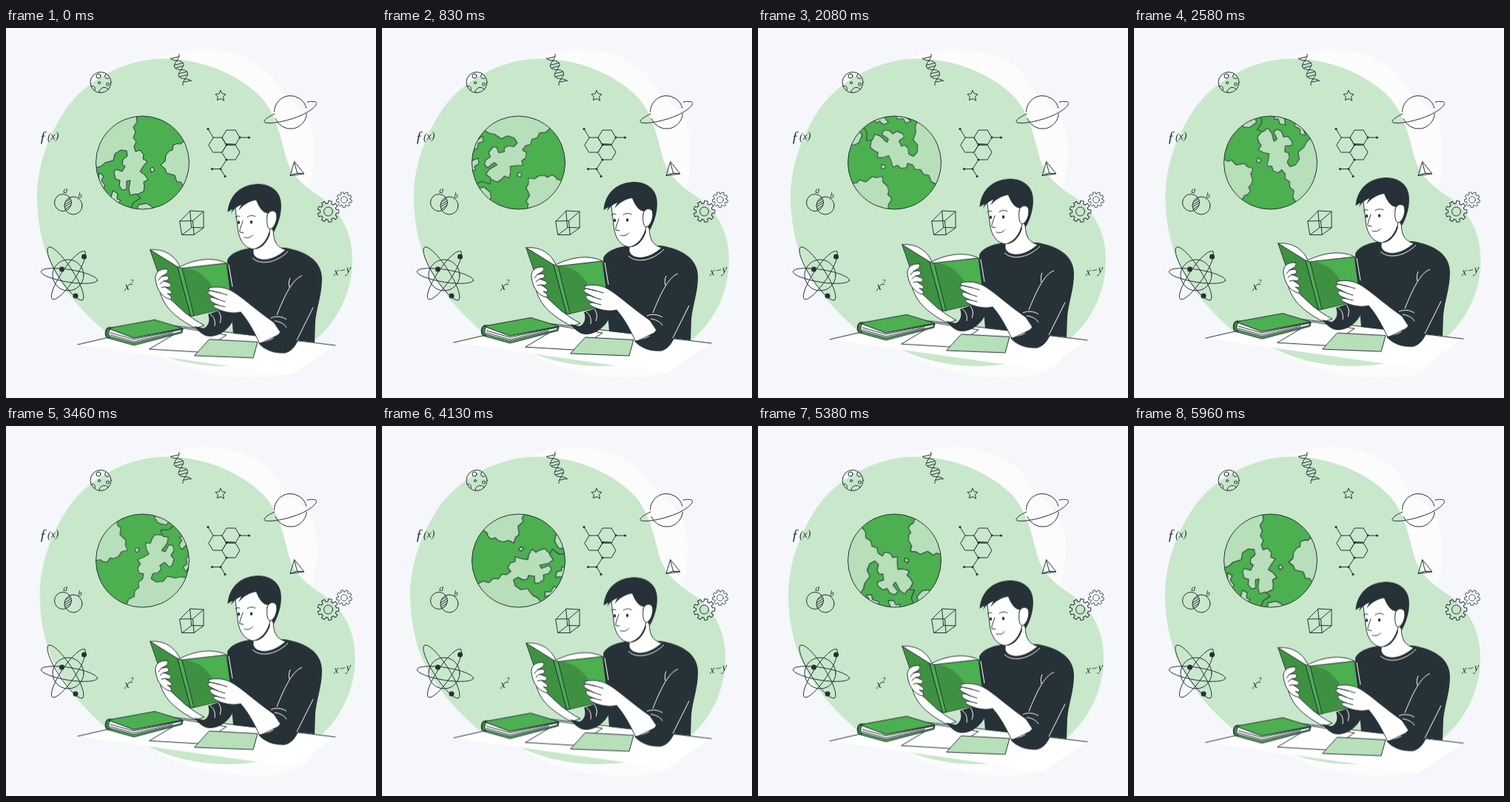
An HTML page without scripts that plays this animation: 500x500 px, repeating every 6 s.

```html
<!DOCTYPE html>
<html lang="en">
<head>
<meta charset="utf-8">
<title>Reading about science</title>
<style>
  html, body { margin: 0; width: 100%; height: 100%; overflow: hidden; background: #f5f7fb; }
  svg { display: block; width: 100%; height: 100%; }
  .line { fill: none; stroke: #263238; stroke-width: 1; stroke-linecap: round; stroke-linejoin: round; }
  .line * { vector-effect: non-scaling-stroke; }
  .dark { fill: #263238; }
  .white { fill: #fff; }
  .green { fill: #4caf50; }
  .deep { fill: #3f9142; }
  .pale { fill: #b7dfb9; }
  .dot { fill: #263238; stroke: none; }
  .fold { fill: none; stroke: #fff; }
  text { font: italic 16px "Liberation Serif", serif; fill: #263238; }
  .blob { animation: shake 6s cubic-bezier(.36, .07, .19, .97) infinite; }
  .land { transform-origin: 184.5px 182px; animation: spin 6s linear infinite; }
  .scene { animation: bob 6s linear infinite; }
  @keyframes spin { to { transform: rotate(360deg); } }
  @keyframes bob {
    0%, 100% { transform: translateY(.7px); }
    50% { transform: translateY(-9.3px); }
  }
  @keyframes shake {
    0%, 100% { transform: translateX(0); }
    10%, 90% { transform: translateX(-1px); }
    20%, 80% { transform: translateX(2px); }
    30%, 50%, 70% { transform: translateX(-4px); }
    40%, 60% { transform: translateX(4px); }
  }
</style>
</head>
<body>
<svg viewBox="0 0 500 500">
  <defs>
    <clipPath id="disc"><circle cx="184.5" cy="182" r="63"/></clipPath>
    <clipPath id="lens"><circle cx="77" cy="236" r="11.5"/></clipPath>
    <path id="tooth" d="M10.3-3.8L10.8-2.3H14.3V2.3H10.8L10.3 3.8"/>
    <g id="three">
      <use href="#tooth"/>
      <use href="#tooth" transform="rotate(40)"/>
      <use href="#tooth" transform="rotate(80)"/>
    </g>
    <g id="gear">
      <use href="#three"/>
      <use href="#three" transform="rotate(120)"/>
      <use href="#three" transform="rotate(240)"/>
      <circle r="6"/>
    </g>
    <path id="hex" d="M-12 0L-6-10H6L12 0 6 10H-6Z"/>
  </defs>

  <g class="blob">
    <path fill="#fcfcfc" d="M180 52C205 38 232 29 265 29C312 29 350 46 367 78C374 92 384 95 396 107C411 122 417 143 417 166C417 190 413 208 405 222L420 428C412 446 400 462 380 468C340 476 285 472 250 462C230 456 205 445 185 430Z"/>
    <path fill="#c9e7cb" d="M42 228C42 190 55 150 78 114C105 72 160 41 215 41.500C270 42 318 66 345 94C366 118 371 148 379 177C387 201 403 213 420 225C448 242 468 272 468 313C468 355 450 393 420 420C387 447 340 457 290 457C250 456 213 446 187 432C166 424 148 421 134 410C92 374 68 340 55 306C46 280 42 254 42 228Z"/>
  </g>

  <g class="line">
    <!-- moon -->
    <circle cx="128" cy="73.500" r="14"/>
    <circle cx="126" cy="74" r="1.500"/>
    <circle cx="125" cy="65" r="3"/>
    <circle cx="137.500" cy="76" r="2"/>
    <path d="M135 62C132 65 134 70 139 68M115 79C118 77 122 80 120 84M126 87C126 80 135 78 138 83"/>

    <!-- helix -->
    <g transform="translate(228 38) rotate(-24.700)">
      <path d="M6.500 0C6.500 6-6.500 7.500-6.500 13.500S6.500 21 6.500 27S-6.500 34.500-6.500 40.500M-6.500 0C-6.500 6 6.500 7.500 6.500 13.500S-6.500 21-6.500 27S6.500 34.500 6.500 40.500"/>
      <path d="M-6 1L5 3M-5 11L6 13M-6 15L4 16.500M-4 24L6 26M-6 28L5 30M-4 37L6 39"/>
    </g>

    <path d="M290 84.500L292.300 88.700 297 89.500 293.500 92.700 294.500 98 290 95.500 285.500 97.500 286.200 92.800 283 89.500 287.700 88.800Z"/>

    <!-- ringed planet -->
    <path d="M362.500 113A22 22 0 0 1 405.800 108M364 122.500A22 22 0 0 0 406.300 116"/>
    <path d="M363 116C350 122 346 127 351 128C360 130 383 125 399 118C414 111 422 103 419 100.500C417 99 412 99 407 100"/>

    <path d="M389.500 181L384 199.500 402.500 197ZM389.500 181L393.500 196 395 198M384 199.500L393.500 196 402.500 197"/>

    <!-- molecule -->
    <use href="#hex" x="304" y="148"/>
    <use href="#hex" x="286" y="158"/>
    <use href="#hex" x="304" y="168"/>
    <path d="M316 148H328M280 148L273 136.500M298 178L290 190.500H278.500M290 190.500L296 200.500M297 156.500L309 157"/>
    <g class="dot">
      <circle cx="328.500" cy="148" r="1.600"/><circle cx="316" cy="148" r="1.400"/>
      <circle cx="273" cy="136.500" r="1.600"/><circle cx="298" cy="178" r="1.500"/>
      <circle cx="290" cy="190.500" r="1.500"/><circle cx="278.500" cy="190.500" r="1.600"/>
      <circle cx="296" cy="200.500" r="1.600"/><circle cx="298" cy="158" r="1.400"/>
    </g>

    <!-- cube -->
    <path d="M235 261L252.500 260.500 254 279.500 238 279.500ZM249 247L267 248 267 270 251 269.500ZM235 261L249 247M252.500 260.500L267 248M254 279.500L267 270M238 279.500L251 269.500"/>

    <!-- sets -->
    <circle cx="77" cy="236" r="11.500"/>
    <circle cx="91" cy="240" r="12"/>
    <path clip-path="url(#lens)" d="M80 235L90 229M79 239L90 232M79 242L90 235M80 245L90 238M82 247L90 241"/>

    <!-- atom -->
    <circle cx="84" cy="334" r="21"/>
    <ellipse cx="85.500" cy="335" rx="38.500" ry="8.500" transform="rotate(9 85.500 335)"/>
    <ellipse cx="80.500" cy="332" rx="42.500" ry="10" transform="rotate(57 80.500 332)"/>
    <ellipse cx="84.500" cy="334" rx="39" ry="9.500" transform="rotate(-56 84.500 334)"/>
    <g class="dot">
      <circle cx="75.500" cy="326" r="3.500"/><circle cx="105.500" cy="309" r="3.500"/><circle cx="94" cy="362" r="3.500"/>
    </g>

    <use href="#gear" transform="translate(435.500 248)"/>
    <use href="#gear" transform="translate(457 232) rotate(12) scale(.73)"/>
  </g>

  <text transform="translate(45 154) rotate(-6) skewX(-8)" style="font-size:20px">ƒ</text>
  <text transform="translate(56 152) rotate(-8) skewX(-8)" style="font-size:14px">(x)</text>
  <text transform="translate(77 223) skewX(-6)" style="font-size:12px">a</text>
  <text transform="translate(97 230) skewX(-4)" style="font-size:11px">b</text>
  <text transform="translate(160 355) rotate(-12) skewX(-14)">x<tspan dy="-6" style="font-size:10px">2</tspan></text>
  <text transform="translate(443 335) rotate(-12) skewX(-14)" style="font-size:15px">x−y</text>

  <!-- globe -->
  <circle class="pale" cx="184.500" cy="182" r="63"/>
  <g clip-path="url(#disc)">
    <g class="land line">
      <path class="green" d="M176 116L177 127 172 134 175 141 172 148 176 154 173 160 175 167 181 165 186 171 185 177 191 180 186 186 181 194 187 198 192 205 186 208 187 214 186 221 177 225 171 234 165 248 177 246 179 239 190 237 197 241 200 250 230 240 242 216 236 208 231 208 228 199 217 196 215 190 209 185 215 180 216 172 221 166 225 165 226 158 232 156 235 157 241 153 252 150 240 110Z"/>
      <path class="green" d="M118 190L128 187 134 182 145 179 147 170 155 165 163 166 164 173 158 178 157 184 161 187 157 194 149 191 146 195 148 204 154 206 153 213 157 219 163 218 163 207 168 206 166 218 168 226 176 224 182 230 172 236 168 248 140 240 120 212Z"/>
      <path class="pale" d="M195 190L198 188 201 192 197 195ZM126 196L132 200 129 206 134 213 131 217 125 212ZM145 220L151 224 150 231 155 233 150 239 142 229Z"/>
    </g>
  </g>
  <circle class="line" cx="184.500" cy="182" r="63"/>

  <g class="scene">
    <!-- desk -->
    <path class="white" d="M97 427L214 400 445 428 385 468Z"/>
    <g class="line">
      <path d="M97 427L214 400 445 428"/>
      <path class="white" d="M194 433L241 405 298 414 263 437Z"/>
      <path class="pale" d="M275 420L340 423.500 334 445 255 442Z"/>
      <path class="green" d="M138 404C133 405 133 417 137 418L173 428 238 411 239 405Z"/>
      <path class="white" d="M141 406L173 418 238 406 236 410 173 425 140 416C137 413 138 409 141 406Z"/>
      <path d="M141 411L173 420 236 407M141 414L173 423 225 411"/>
      <path class="green" d="M138 405L201 393.500 239 405 173 418Z"/>
      <path class="deep" d="M138 405C134 406 134 416 138 418L141 417C138 414 138 409 141 406Z"/>
    </g>

    <!-- body -->
    <path class="dark" d="M299 313C303 303 318 298 334 296H376C404 300 427 313 427 338C427 360 420 375 418 396L417 424 307 412 305 388 300 345Z"/>
    <path class="line white" d="M334 296V304C338 315 358 317 378 299C366 295 361 289 361 268L350 268Z"/>
    <path class="fold" d="M333 310C346 322 369 314 381 301M301 319L306 349"/>

    <!-- far arm -->
    <path class="line white" d="M207 350C211 374 226 389 256 405L268 401C250 392 234 379 226 362Z"/>
    <path class="dark" d="M254 402L267 405C274 402 276 394 273 386L300 377 309 390C302 407 288 417 274 416C266 415 260 409 254 402Z"/>
    <path class="fold" d="M276 386C282 390 283 396 282 402M287 382C291 387 291 393 289 398"/>

    <!-- open book -->
    <g class="line">
      <path class="white" d="M195 299C213 297 228 306 235 322C252 313 278 307 298 317L300 330 236 334Z"/>
      <path class="deep" d="M195 299L232 322 250 388.500 243 385 216 360Z"/>
      <path class="green" d="M236 324L298 317 306 376 252 388.500Z"/>
      <path class="deep" stroke="none" d="M238 324.500L243 324C262 326 279 341 286 366L288 380 254 387Z"/>
      <path class="green" d="M232 322L238 324 254 388 250 388.500Z"/>

      <!-- far hand -->
      <path class="white" d="M218 325C206 324 201 331 202 339C204 354 211 363 222 366C225 364 223 361 218 358C223 360 226 357 222 354L215 349C222 351 225 347 221 344L213 341C220 341 222 336 217 334L210 335C216 332 221 329 218 325Z"/>
      <path d="M210 335L206 340M213 341L208 345M215 349L210 350"/>
    </g>

    <!-- near arm -->
    <path class="line white" d="M274 351C280 348 294 349 302 353C318 361 333 377 362 397L372 412 343 426C336 411 327 394 317 383C307 386 292 383 282 377C278 374 283 372 288 374C280 371 274 368 276 364C277 362 282 364 287 366C277 361 270 358 274 355C277 353 283 356 289 357C280 355 271 354 274 351Z"/>
    <path class="line" d="M288 374L296 376M287 366L296 369M289 357L299 360"/>
    <path class="dark" d="M400 333C384 342 373 369 360 396C367 396 372 402 371 408C368 418 354 423 341 425C350 436 366 440 378 438.500C390 435 394 423 402 407L421 374 420 340Z"/>
    <path class="fold" d="M400 334C386 339 375 365 366 387M384 337C382 341 382 346 383 350M358 391C365 388 373 389 379 393M363 395C371 396 377 400 379 404M415 377L393 421"/>

    <!-- head -->
    <path class="dark" d="M334 298C344 299 353 290 357 277L355 272 332 292Z"/>
    <path class="line white" d="M310 243C311 252 312 260 313 268C314 283 321 297 335 298C346 295 354 285 357 271L356 230 320 231Z"/>
    <path class="dark" d="M299.500 248C301 229 313 213 335 210.500C353 208 368 217 371 231C374 245 369 263 362 275L357 268 354 250C347 249 342 242 338 232C329 233 321 238 314 246L318 238C311 241 307 245 304 250L306 244Z"/>
    <path class="line white" d="M353 253C354 247 361 244 365 249C368 256 363 270 357 271C353 270 352 262 353 253Z"/>
    <g class="line">
      <path d="M310 255C312 253 314 253 316 254M326 254.500C330 252 334 252 337 254M320 260C318 267 315 272 316 275L321 276M322 282C327 284 331 282 333.500 279"/>
      <ellipse class="dot" cx="314.500" cy="262" rx="1.600" ry="2.200"/>
      <ellipse class="dot" cx="331.500" cy="261.500" rx="1.700" ry="2.300"/>
    </g>
  </g>
</svg>
</body>
</html>
```
